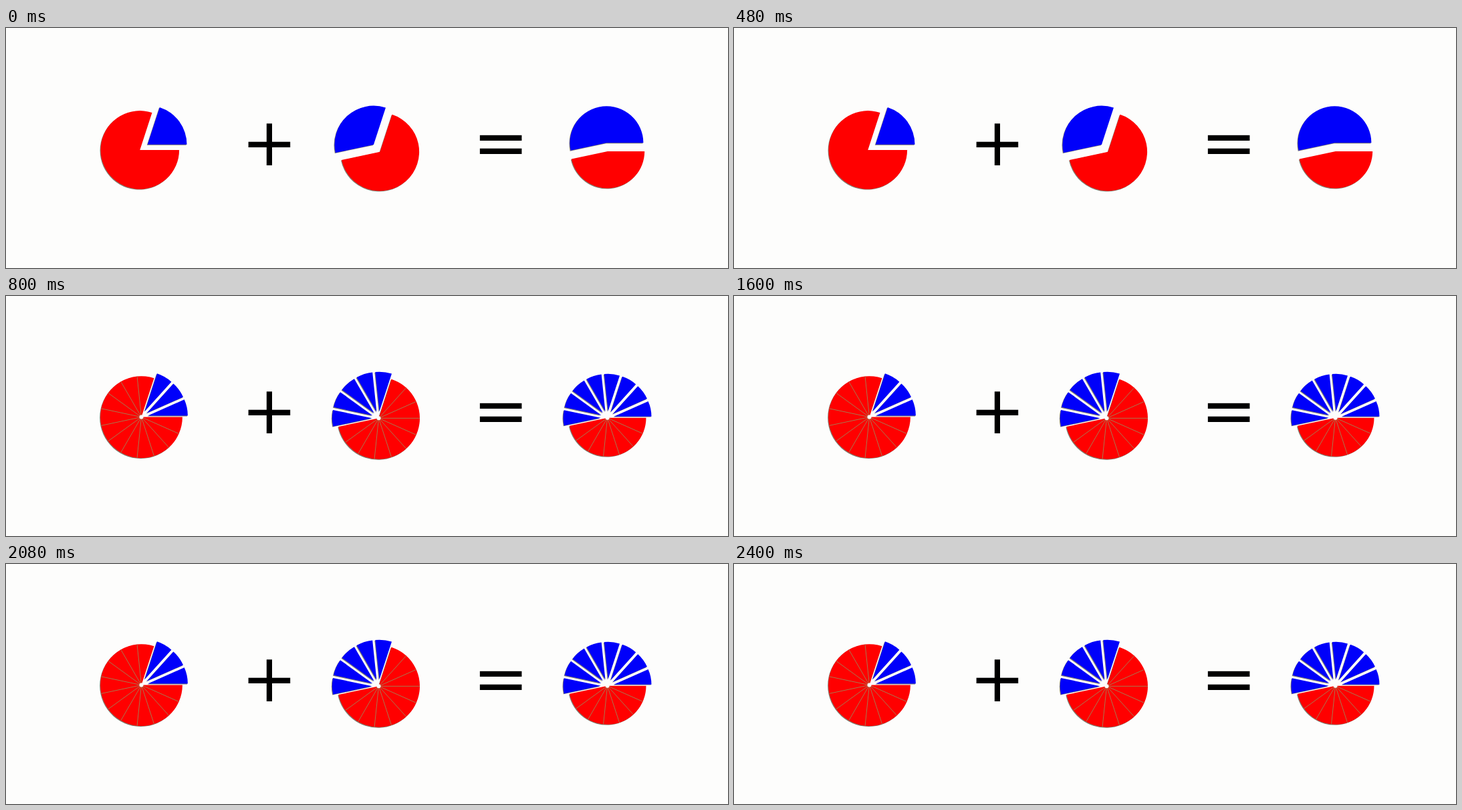
Recreate the animation shown at these times as an HTML page. Size 1080x360 px, loop 3200 ms.

```html
<!DOCTYPE html>
<html lang="en">
<head>
<meta charset="utf-8">
<title>Adding fractions with pies</title>
<style>
  html, body { margin: 0; width: 100%; height: 100%; overflow: hidden; background: #fdfdfc; }
  svg { display: block; width: 1080px; height: 360px; }
  text { font: 100px "DejaVu Sans", sans-serif; fill: #000; }
</style>
</head>
<body>
<svg viewBox="0 0 1080 360">
  <g id="whole"></g>
  <g id="sliced"></g>
  <text x="352.1" y="206">+</text>
  <text x="698.2" y="206">=</text>
</svg>
<script>
const NS = "http://www.w3.org/2000/svg";
const RED = "#ff0000", BLUE = "#0000fa", PAPER = "#fdfdfc";
const SHADE = "#807d70", SEAM = "#a87850";
const LOOP = 3200, HOLD = 800, STEP = 24, PUSH = 10;
const whole = document.getElementById("whole");
const sliced = document.getElementById("sliced");

function add(parent, tag, attrs) {
  const node = document.createElementNS(NS, tag);
  for (const key in attrs) node.setAttribute(key, attrs[key]);
  parent.appendChild(node);
}

// Angles are in degrees, counterclockwise from the right.
function polar(x, y, r, deg) {
  const a = deg * Math.PI / 180;
  return [x + r * Math.cos(a), y - r * Math.sin(a)];
}

function wedge(parent, x, y, r, from, to, fill) {
  const large = to - from > 180 ? 1 : 0;
  const d = `M${x} ${y}L${polar(x, y, r, from)}A${r} ${r} 0 ${large} 0 ${polar(x, y, r, to)}Z`;
  add(parent, "path", { d, fill: SHADE, transform: "translate(-0.9 0.9)" });
  add(parent, "path", { d, fill });
}

function slicedPie(x, y, r, from, to) {
  wedge(sliced, x, y, r, to, from + 360, RED);
  for (let a = to + STEP; a < from + 360; a += STEP) {
    const [x2, y2] = polar(x, y, r, a);
    add(sliced, "line", { x1: x, y1: y, x2, y2, stroke: SEAM, "stroke-width": 1 });
  }
  add(sliced, "circle", { cx: x, cy: y, r: 3, fill: PAPER });
  for (let a = from; a < to; a += STEP) {
    const [ax, ay] = polar(x, y, PUSH, a + STEP / 2);
    wedge(sliced, ax, ay, r - 1.8, a, a + STEP, BLUE);
  }
}

wedge(whole, 200.3, 182.9, 58.8, 72, 360, RED);
wedge(whole, 211.7, 174.8, 58.8, 0, 72, BLUE);
wedge(whole, 559.4, 185.7, 58.7, 192, 432, RED);
wedge(whole, 549.9, 175, 58.4, 72, 192, BLUE);
wedge(whole, 899.9, 185.1, 55.3, 192, 360, RED);
wedge(whole, 898.4, 172.3, 55, 0, 192, BLUE);

slicedPie(202.5, 181.6, 61.4, 0, 72);
slicedPie(557.5, 183.3, 61.5, 72, 192);
slicedPie(899.6, 182.8, 57.9, 0, 192);

function draw(t) {
  const first = t % LOOP < HOLD;
  whole.style.display = first ? "" : "none";
  sliced.style.display = first ? "none" : "";
}

const start = performance.now();
function tick() {
  draw(performance.now() - start);
  requestAnimationFrame(tick);
}
tick();
</script>
</body>
</html>
```
